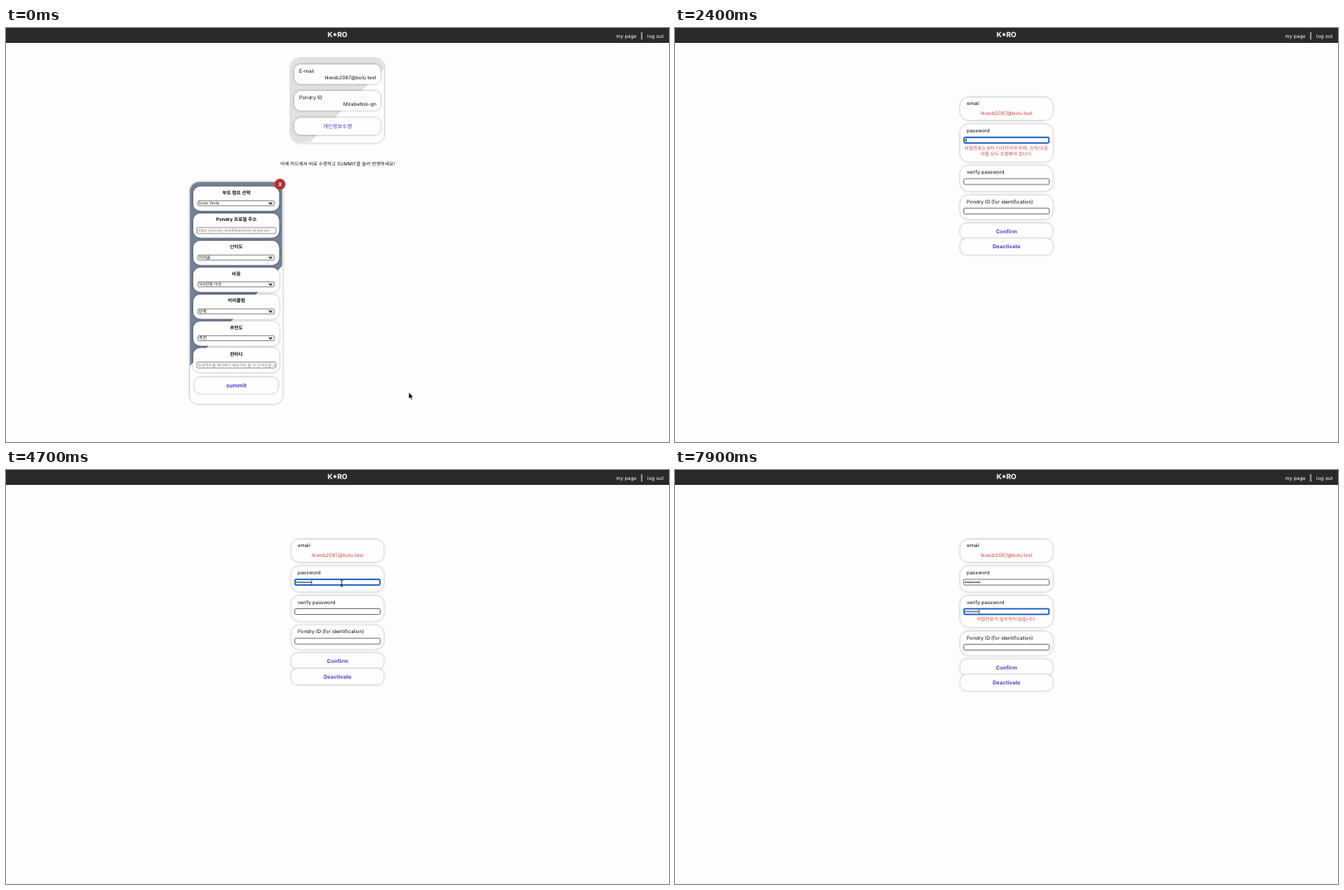
Write an HTML page that moves like this. It is 800 by 500 pixels and loops after 8000 ms.

```html
<!DOCTYPE html>
<html lang="ko">
<head>
<meta charset="utf-8">
<style>
html, body { margin: 0; width: 100%; height: 100%; overflow: hidden; background: #fdfdfd; }
svg { display: block; width: 100%; height: 100%; }
text { font-family: Inter, "Noto Sans CJK KR", "Noto Sans CJK", sans-serif; text-rendering: geometricPrecision; white-space: pre; }
</style>
</head>
<body>
<svg viewBox="0 0 800 500">
  <defs>
    <filter id="shade" x="-20%" y="-40%" width="140%" height="180%">
      <feDropShadow dx="0" dy="0" stdDeviation="1.7" flood-color="#000" flood-opacity=".4"/>
    </filter>
    <clipPath id="infoClip"><rect x="344" y="37" width="112" height="101.5" rx="10"/></clipPath>
    <clipPath id="formClip"><rect x="222" y="186" width="111.5" height="268" rx="11"/></clipPath>
    <clipPath id="fieldClip"><rect x="230" y="186" width="95.3" height="268"/></clipPath>
  </defs>
  <g id="page"></g>
  <rect width="800" height="18" fill="#2a2a2a"/>
  <g fill="#fff">
    <text x="400" y="11.2" font-size="8.6" font-weight="700" text-anchor="middle">K*RO</text>
    <text x="736.3" y="11.6" font-size="6">my page</text>
    <text x="774" y="11.6" font-size="6">log out</text>
    <rect x="766.6" y="5" width=".9" height="9"/>
  </g>
  <g id="cursor">
    <path id="arrow" d="M0 0V7.8L1.8 6.2L3 9L4.4 8.4L3.2 5.7H5.6Z" fill="#000" stroke="#fff" stroke-width=".5"/>
    <path id="beam" d="M-1.6-3.8Q0-3.8 0-2.8V2.8Q0 3.8-1.6 3.8M1.6-3.8Q0-3.8 0-2.8M1.6 3.8Q0 3.8 0 2.8M-1.1 1.2H1.1" fill="none" stroke="#111" stroke-width=".8"/>
  </g>
</svg>
<script>
const LOOP = 8000;
const MAIL = 'tkwob2087@bolu.test', USER = 'Mirabeltok-qn', HUB = 'Pondry';
const RED = '#dc4646', VIOLET = '#5640c6';
const $ = id => document.getElementById(id);

const text = (s, x, y, size = 6, { fill = '#111', weight = 400, anchor = 'start', more = '' } = {}) =>
  `<text x="${x}" y="${y}" font-size="${size}" fill="${fill}" font-weight="${weight}" text-anchor="${anchor}" ${more}>${s}</text>`;
const mid = (s, x, y, size, fill, weight) => text(s, x, y, size, { fill, weight, anchor: 'middle' });
const card = (x, y, w, h, r = 9) =>
  `<rect x="${x}" y="${y}" width="${w}" height="${h}" rx="${r}" fill="#fefefe" filter="url(#shade)"/>`;
const box = (x, y, w, h, stroke = '#555', sw = .8, r = 1.2) =>
  `<rect x="${x}" y="${y}" width="${w}" height="${h}" rx="${r}" fill="#fff" stroke="${stroke}" stroke-width="${sw}"/>`;

// First page: profile card and review form
const ROWS = [
  ['부트 캠프 선택', 191.5, 'Dune Yards', 4.5],
  [HUB + ' 프로필 주소', 224, 'https:/' + `/${HUB.toLowerCase()}.test/${USER}/person`, 4.5, true],
  ['난이도', 257, '어려움', 5],
  ['비용', 289.5, '100만원 이상', 4.8],
  ['커리큘럼', 322, '만족', 5],
  ['추천도', 354.5, '추천', 5],
  ['한마디', 386.5, '프로젝트를 백지부터 배포까지 할 수 있어진걸 느', 4.7, true]
];

function row([title, y, value, size, input]) {
  const c = y + (input ? 20.6 : 20.2);
  let s = card(226, y, 103.5, 29.3, 8.5) + mid(title, 278, y + 9.4, 5.7, '#111', 700);
  if (input) {
    return s + box(230.3, c - 3.6, 95.4, 7.2, '#666', .7) +
      `<g clip-path="url(#fieldClip)">${text(value, 231.6, c + 1.6, size, { fill: '#777' })}</g>`;
  }
  return s + box(231.6, c - 3, 92, 6, '#555', .7) + text(value, 232.8, c + 1.7, size) +
    `<path d="M317.3 ${c - 1}l1.9 2l1.9-2" fill="none" stroke="#000" stroke-width="1.1"/>`;
}

function profilePage(focus) {
  return card(344, 37, 112, 101.5, 10) +
    '<path d="M344 37H456V49L366.5 138.5H344Z" fill="#e1e1e1" clip-path="url(#infoClip)"/>' +
    card(348, 44, 104, 23.5, 8) + card(348, 76, 104, 23.5, 8) +
    text('E-mail', 353.7, 54) + text(MAIL, 446.7, 62.3, 6, { anchor: 'end' }) +
    text(HUB + ' ID', 353.7, 85.7) + text(USER, 446.7, 94.2, 6, { anchor: 'end' }) +
    (focus ? box(348.8, 110, 102.4, 18.6, '#1d62c4', 1.7, 1) : card(348, 108.5, 104, 20.5, 8)) +
    mid('개인정보수정', 400, 121.2, 6.35, '#4636c4') +
    mid('아래 카드에서 바로 수정하고 SUMMIT을 눌러 반영하세요!', 400, 166.2, 5.65, '#111') +
    card(222, 186, 111.5, 268, 11) +
    '<path d="M222 186H333.5V287L222 408Z" fill="#748297" clip-path="url(#formClip)"/>' +
    ROWS.map(row).join('') +
    card(227.5, 422, 100.5, 19.3, 8) + mid('summit', 278, 434.2, 6.7, VIOLET, 700) +
    '<circle cx="330.6" cy="188.6" r="6.6" fill="#b53030"/>' + mid('X', 330.6, 190.9, 6, '#fff', 700);
}

// Second page: account form whose cards grow with their error lines
function field(label, y, h, { chars = 0, focus = false, errors = [] } = {}) {
  const c = y + 19;
  let s = card(344.5, y, 111, h + errors.length * 7.25, 10) + text(label, 352, y + 9.6);
  s += focus ? box(348.8, c - 3.3, 102.4, 6.6, '#1d62c4', 1.7) : box(348.5, c - 3.5, 103, 7);
  for (let i = 0; i < chars; i++) s += `<circle cx="${350.7 + i * 1.9}" cy="${c}" r=".72"/>`;
  if (focus) s += `<rect x="${349.6 + chars * 1.9}" y="${c - 2.6}" width=".6" height="5.2"/>`;
  errors.forEach((e, i) => s += mid(e, 400, c + 11 + i * 7.25, 5.6, RED));
  return s;
}

function accountPage(pass, verify) {
  const d1 = pass.errors.length * 7.25, d2 = d1 + verify.errors.length * 7.25;
  return card(344.5, 84, 111, 27, 10) + text('email', 352, 93.4) + mid(MAIL, 400, 104.5, 6, RED) +
    field('password', 116.5, 30.2, pass) +
    field('verify password', 152 + d1, 30.2, verify) +
    field(HUB + ' ID (for identification)', 187.7 + d2, 28.5) +
    card(344.5, 221.6 + d2, 111, 19, 8) + mid('Confirm', 400, 233.3 + d2, 6.4, VIOLET, 700) +
    card(344.5, 240 + d2, 111, 19, 8) + mid('Deactivate', 400, 251.8 + d2, 6.4, VIOLET, 700);
}

const PASS_KEYS = [2300, 2500, 2700, 2900, 3100, 3200, 3500, 3700, 3900, 4400];
const VERIFY_KEYS = [6000, 6200, 6300, 6400, 6600, 6900, 7100, 7300, 7500];
const typed = (keys, t) => keys.filter(k => t >= k).length;

function passErrors(n) {
  if (n > 0 && n < 8) return ['비밀번호는 8자 이상이어야 하며, 숫자/소문', '자를 모두 포함해야 합니다.'];
  return n === 9 ? ['이전 비밀번호와 동일합니다.'] : [];
}

// Pointer path: time, x, y
const PATH = [
  [80, 486, 440], [700, 427.8, 110.8], [1250, 427.8, 110.8], [1600, 405, 137],
  [4700, 405, 137], [5250, 403.2, 175.2], [5450, 403.2, 175.2], [5700, 403.2, 171.5]
];

function pointer(t) {
  const i = PATH.findIndex(p => p[0] > t);
  if (i < 1) return (i ? PATH[PATH.length - 1] : PATH[0]).slice(1);
  const a = PATH[i - 1], b = PATH[i];
  const u = (t - a[0]) / (b[0] - a[0]), e = u * u * (3 - 2 * u);
  return [a[1] + (b[1] - a[1]) * e, a[2] + (b[2] - a[2]) * e];
}

let shown = '';
function draw(t) {
  const n = typed(PASS_KEYS, t), m = typed(VERIFY_KEYS, t);
  const first = t < 900, click = t >= 700;
  const passOn = t >= 1800 && t < 5200, verifyOn = t >= 5800;
  const key = [first, click, n, m, passOn, verifyOn].join();
  if (key !== shown) {
    shown = key;
    $('page').innerHTML = first ? profilePage(click) : accountPage(
      { chars: n, focus: passOn, errors: passErrors(n) },
      { chars: m, focus: verifyOn, errors: m ? ['비밀번호가 일치하지 않습니다.'] : [] });
  }
  const [x, y] = pointer(t);
  const overField = !first && (y > 131.5 && y < 139.5 || y > 167 && y < 174.6);
  const hidden = t >= 2300 && t < 4700 || t >= 6000;
  $('cursor').setAttribute('transform', `translate(${x} ${y})`);
  $('cursor').style.display = hidden ? 'none' : '';
  $('arrow').style.display = overField ? 'none' : '';
  $('beam').style.display = overField ? '' : 'none';
}

const start = performance.now();
function tick() {
  draw((performance.now() - start) % LOOP);
  requestAnimationFrame(tick);
}
tick();
</script>
</body>
</html>
```
